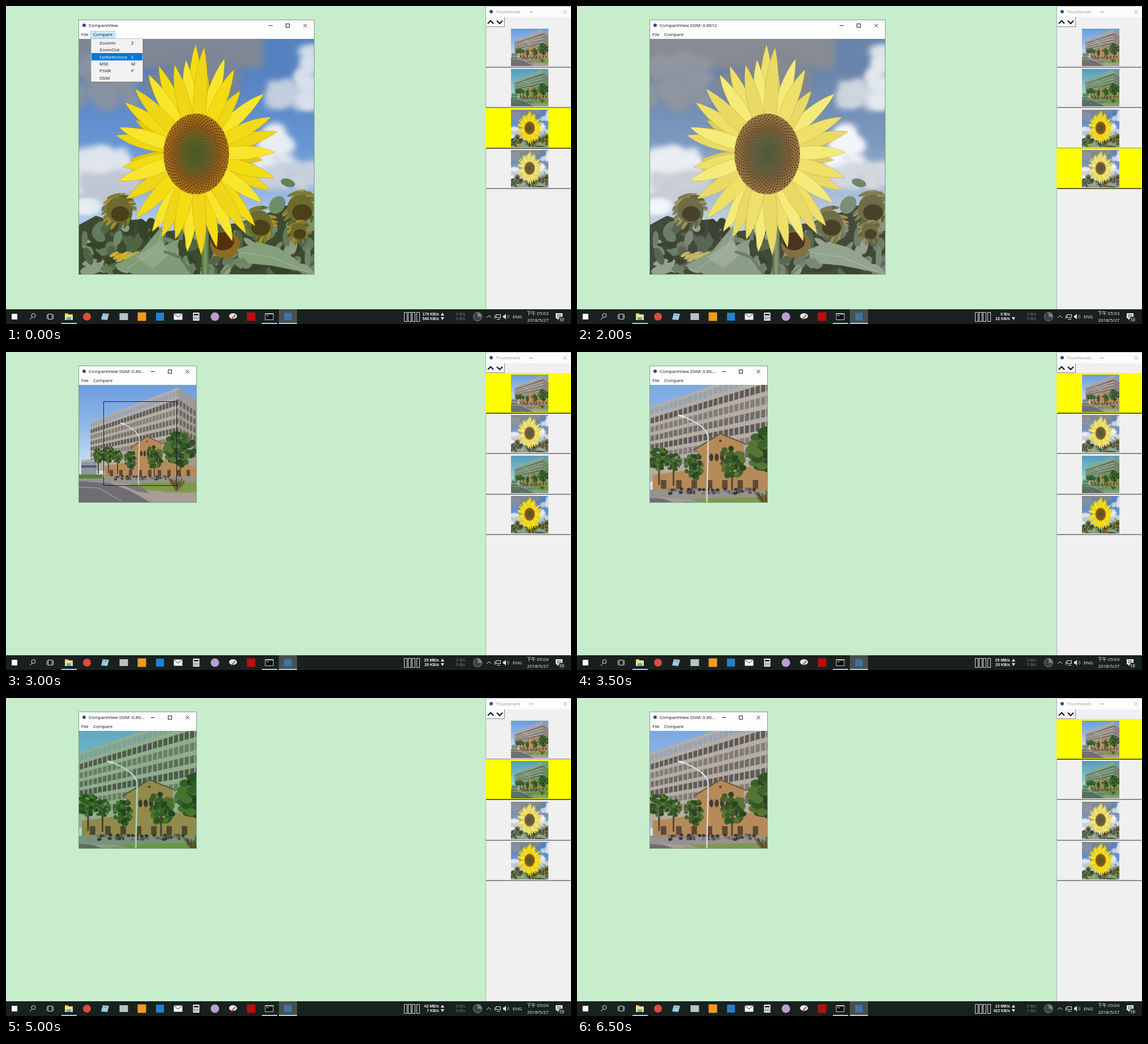
An HTML page with a canvas for the animation above (7 s loop, 998 by 561 pixels).

```html
<!DOCTYPE html>
<html lang="en">
<head>
<meta charset="utf-8">
<title>CompareView</title>
<style>
  html, body { margin: 0; width: 100%; height: 100%; overflow: hidden; background: #c7edcc; }
  canvas { display: block; }
</style>
</head>
<body>
<canvas id="stage" width="998" height="561"></canvas>
<script>
const stage = document.getElementById('stage').getContext('2d');
let c = stage; // current drawing context
const UI = '8px "Open Sans", "Noto Sans CJK TC", "Noto Sans CJK", sans-serif';
const METER = 'bold 7px "Liberation Sans", sans-serif';

// ---------- drawing helpers ----------
function seeded(seed) {
  return () => (seed = (seed * 16807) % 2147483647) / 2147483647;
}
function rect(x, y, w, h, fill) { c.fillStyle = fill; c.fillRect(x, y, w, h); }
function box(x, y, w, h, stroke) {
  c.strokeStyle = stroke; c.lineWidth = 1;
  c.strokeRect(x + .5, y + .5, w - 1, h - 1);
}
function ellipse(x, y, rx, ry, fill, turn = 0) {
  c.fillStyle = fill; c.beginPath(); c.ellipse(x, y, rx, ry, turn, 0, 7); c.fill();
}
function trace(points) {
  c.beginPath();
  for (let i = 0; i < points.length; i += 2) c.lineTo(points[i], points[i + 1]);
}
function poly(fill, ...points) { c.fillStyle = fill; trace(points); c.fill(); }
function line(stroke, width, ...points) {
  c.strokeStyle = stroke; c.lineWidth = width; trace(points); c.stroke();
}
function text(s, x, y, fill = '#111', font = UI, align = 'left') {
  c.font = font; c.textAlign = align; c.fillStyle = fill; c.fillText(s, x, y);
}
function blend(x0, y0, x1, y1, ...stops) {
  const g = c.createLinearGradient(x0, y0, x1, y1);
  stops.forEach((s, i) => g.addColorStop(i / (stops.length - 1), s));
  return g;
}

// ---------- pictures ----------
function picture(units, pixels, paint) {
  const canvas = document.createElement('canvas');
  canvas.width = canvas.height = pixels;
  c = canvas.getContext('2d');
  c.scale(pixels / units, pixels / units);
  paint();
  c = stage;
  return canvas;
}

function cloud(x, y, w, h, fill, rnd) {
  for (let i = 0; i < 30; i++) {
    const r = 6 + rnd() * Math.min(w, h) * .18;
    ellipse(x + rnd() * w, y + rnd() * h, r * 1.3, r, fill);
  }
}

function petal(x, y, width, fill) {
  const a = Math.atan2(y, x), length = Math.hypot(x, y);
  c.save();
  c.rotate(a);
  c.beginPath();
  c.moveTo(38, -width * .5);
  c.bezierCurveTo(length * .55, -width, length * .82, -width * .8, length, 0);
  c.bezierCurveTo(length * .82, width * .6, length * .55, width, 38, width * .5);
  c.fillStyle = fill; c.fill();
  c.strokeStyle = 'rgba(175,130,0,.4)'; c.lineWidth = .8; c.stroke();
  c.restore();
}

function droopingHead(x, y, r, rnd) {
  for (let i = 0; i < 26; i++) {
    const a = rnd() * 6.3;
    ellipse(x + Math.cos(a) * r * .8, y + Math.sin(a) * r, 3, r * .42,
            ['#a58d2a', '#7c7a35', '#58652a'][i % 3], a * .3);
  }
  ellipse(x, y, r * .8, r * .85, '#6c6b2e');
  ellipse(x + r * .1, y + r * .25, r * .6, r * .5, '#4b4019');
}

const petalTips = [
  335,68, 350,73, 386,93, 403,112, 414,150, 455,155, 468,196, 479,222, 475,258,
  474,303, 466,325, 452,347, 440,388, 424,402, 400,415, 372,426, 345,440, 320,434,
  299,412, 275,408, 258,398, 228,375, 212,340, 199,308, 206,284, 194,228, 200,214,
  210,170, 228,146, 252,121, 270,106, 298,104, 318,95];

function paintSunflower() {
  const rnd = seeded(77);
  rect(0, 0, 415, 415, blend(0, 60, 0, 320, '#5682c2', '#6897d4', '#aecaea'));
  c.filter = 'blur(6px)';
  rect(-10, -10, 335, 62, '#7e8894');
  cloud(0, 40, 95, 70, '#8792a2', rnd);
  cloud(130, 40, 170, 60, '#7b8593', rnd);
  cloud(340, 80, 60, 35, '#c3cfdf', rnd);
  cloud(390, 15, 25, 110, '#d9e1ec', rnd);
  cloud(0, 200, 85, 70, '#e0e5ed', rnd);
  cloud(10, 240, 90, 45, '#c0c8d4', rnd);
  cloud(320, 160, 50, 75, '#e9edf3', rnd);
  cloud(325, 225, 90, 32, '#c9d1dd', rnd);
  cloud(0, 292, 35, 8, '#e8edf4', rnd);
  c.filter = 'none';

  // field
  poly('#3d4a2f', 0,328, 30,312, 60,322, 110,318, 150,340, 280,325, 340,305, 360,295,
       400,290, 415,290, 415,415, 0,415);
  for (let i = 0; i < 150; i++) {
    const x = rnd() * 415, y = 328 + rnd() * 87;
    ellipse(x, y, 8 + rnd() * 13, 4 + rnd() * 7,
            ['#71866a', '#8c9d83', '#4f6644', '#35432a', '#647b5b'][i % 5], rnd() * 3);
  }
  ellipse(350, 293, 17, 13, '#6d8d69', -.9);
  ellipse(369, 254, 13, 7, '#62835a', .3);
  ellipse(410, 322, 9, 18, '#79946f');
  droopingHead(70, 302, 27, rnd);
  droopingHead(318, 326, 28, rnd);
  droopingHead(391, 299, 29, rnd);
  droopingHead(388, 340, 18, rnd);
  ellipse(258, 363, 26, 24, '#8d6a24');
  ellipse(254, 357, 20, 16, '#54310e');
  for (let i = 0; i < 8; i++) ellipse(62 + i * 6, 380 + i % 3 * 4, 9, 3, '#d0b02c', -.5);

  // stem and big leaves
  rect(216, 310, 13, 105, blend(216, 0, 229, 0, '#47673a', '#7f9c66', '#54733f'));
  poly('#7f9b77', 62,400, 110,374, 146,330, 150,365, 178,352, 168,382, 198,415, 95,415);
  poly('#91a887', 100,385, 146,355, 160,380, 130,405);
  poly('#86a07c', 278,372, 315,358, 352,368, 385,390, 410,414, 340,400, 300,396);
  line('#5f7d52', 5, 150,375, 178,385, 200,413);
  line('#6a875b', 4, 250,415, 270,397, 292,390);
  line('#a9bb9c', 1, 282,376, 340,385, 405,412);
  line('#a9bb9c', 1, 146,340, 136,372, 85,405);

  // blossom
  c.save();
  c.translate(207, 203);
  for (let i = 0; i < petalTips.length; i += 2) {
    const a = Math.atan2(petalTips[i + 1] - 261, petalTips[i] - 336) + .1;
    petal(Math.cos(a) * 118, Math.sin(a) * 142, 14, '#e6c80e');
  }
  for (let i = 0; i < petalTips.length; i += 2) {
    const n = (i * 5) % petalTips.length;
    petal(petalTips[n] - 336, petalTips[n + 1] - 261, 16,
          ['#f2dc14', '#f8e62c', '#efd616'][i / 2 % 3]);
  }
  c.scale(1, 1.23);
  const disc = c.createRadialGradient(0, 0, 4, 0, 0, 58);
  disc.addColorStop(0, '#4b5a26');
  disc.addColorStop(.45, '#6a5f24');
  disc.addColorStop(.65, '#8a5a1c');
  disc.addColorStop(1, '#b27a18');
  ellipse(0, 0, 58, 58, disc);
  for (let i = 1; i < 620; i++) {
    const r = 57 * Math.sqrt(i / 620), a = i * 2.39996;
    ellipse(Math.cos(a) * r, Math.sin(a) * r, .4 + r / 75, .4 + r / 75,
            r > 28 ? '#5c360f' : '#3d4418');
  }
  c.restore();
}

function tree(x, y, rx, ry, rnd) {
  line('#574735', 2, x, y, x, y + ry + 17);
  for (let i = 0; i < 60; i++) {
    const a = rnd() * 6.3, d = Math.sqrt(rnd()) * .85;
    ellipse(x + Math.cos(a) * rx * d, y + Math.sin(a) * ry * d, rx * .2, ry * .15,
            ['#2a4522', '#3d612c', '#335426', '#567433'][i % 4]);
  }
}

function paintBuilding() {
  const rnd = seeded(31);
  rect(0, 0, 207, 207, blend(0, 0, 0, 145, '#6c9ddd', '#90b9ea', '#cfe0f3'));

  // office block in perspective
  poly('#b5ada4', 20,66, 176,4, 176,162, 20,150);
  poly('#a1998f', 176,4, 207,27, 207,162, 176,162);
  const columns = 29, floors = 7;
  for (let i = 0; i < columns; i++) {
    const x = u => 20 + 156 * Math.pow(u, 1.12);
    const x0 = x((i + .2) / columns), x1 = x((i + .95) / columns);
    for (let j = 0; j < floors; j++) {
      const y = (px, v) => {
        const top = 66 - (px - 20) * .397;
        return top + (138 - (px - 20) * .12 - top) * v;
      };
      const v0 = (j + .28) / floors, v1 = (j + .9) / floors;
      const glass = j ? ['#706d6a', '#5e5a58', '#827d78'][(i * 3 + j) % 3] : '#93a4b8';
      poly(glass, x0, y(x0, v0), x1, y(x1, v0), x1, y(x1, v1), x0, y(x0, v1));
    }
  }
  for (let j = 0; j < floors; j++)
    for (let i = 0; i < 5; i++) {
      const x = 178 + i * 6, y = 11 + j * 16.5 + i * (4.4 - j * .45);
      poly(j ? '#6a6561' : '#8f9cac', x, y, x + 4, y + 2.5, x + 4, y + 12, x, y + 10);
    }

  // brick hall
  poly('#b58a58', 45,143, 94,136, 94,109, 120,91, 146,103, 147,132, 207,144, 207,164, 45,162);
  line('#6b5542', 1.5, 90,112, 120,91, 148,104);
  ellipse(120, 100, 1.5, 1.5, '#5e4330');
  for (let i = 0; i < 4; i++) ellipse(110 + i * 6, 121, 2.2, 5, '#463833');
  for (let i = 0; i < 9; i++) rect(54 + i * 17, 150, 6, 11, '#5d4936');

  // left pavilion
  rect(4, 136, 27, 26, '#8d969e');
  ellipse(17, 134, 13, 2.5, '#a4adb4');
  rect(4, 142, 27, 4, '#535e68');

  // ground
  rect(0, 162, 207, 45, '#96928e');
  poly('#6d6d72', 0,170, 60,174, 85,184, 125,207, 0,207);
  poly('#a89c96', 52,172, 120,176, 150,190, 207,188, 207,207, 128,207, 88,186);
  poly('#7d9a4a', 85,174, 207,170, 207,190, 160,189, 112,184);
  poly('#7a7775', 78,177, 110,179, 125,191, 102,188);
  line('#b5b3b2', 1, 0,180, 35,182, 75,205);
  rect(0, 158, 42, 7, '#5b8039');

  tree(34, 125, 10, 15, rnd);
  tree(52, 123, 13, 16, rnd);
  tree(68, 127, 9, 13, rnd);
  tree(91, 132, 11, 19, rnd);
  tree(133, 127, 16, 23, rnd);
  tree(179, 113, 30, 33, rnd);
  for (let i = 0; i < 60; i++)
    ellipse(62 + rnd() * 100, 161 + rnd() * 6, 2, 1.8, ['#37353a', '#5a5457', '#81797a'][i % 3]);
  for (let i = 0; i < 26; i++)
    line(i % 2 ? '#5f4634' : '#6e6d35', 1.6, 172, 187, 157 + rnd() * 30, 163 + rnd() * 13);

  // street lamp
  c.strokeStyle = '#d9dcdf'; c.lineWidth = 1.5;
  c.beginPath(); c.moveTo(105, 178); c.lineTo(106.5, 95);
  c.quadraticCurveTo(104, 80, 78, 69); c.stroke();
  ellipse(77, 68.5, 4, 1.3, '#e3e7ec', .3);
}

const sunflower = picture(415, 415, paintSunflower);
const building = picture(207, 414, paintBuilding);
const photos = {
  sunflower: { image: sunflower, size: 415 },
  faded: { size: 415, image: picture(415, 415, () => {
    c.filter = 'saturate(.58) brightness(1.04)';
    c.drawImage(sunflower, 0, 0);
  }) },
  building: { image: building, size: 207 },
  green: { size: 207, image: picture(207, 414, () => {
    c.drawImage(building, 0, 0, 207, 207);
    c.globalCompositeOperation = 'multiply';
    rect(0, 0, 207, 207, '#cdffd9');
  }) },
};
for (const p of Object.values(photos))
  p.thumb = picture(66, 66, () => {
    c.imageSmoothingQuality = 'high';
    c.drawImage(p.image, 0, 0, 66, 66);
  });

// ---------- windows ----------
function minimize(x, y, ink) { rect(x - 3, y, 7, 1, ink); }
function closeMark(x, y, ink) {
  line(ink, 1, x - 3, y - 3, x + 3, y + 3);
  line(ink, 1, x - 3, y + 3, x + 3, y - 3);
}
function appIcon(x, y) { ellipse(x, y, 3, 3, '#2d4f82'); }

const menuItems = [['ZoomIn', 'Z'], ['ZoomOut', ''], ['SetReference', 'S'],
                   ['MSE', 'M'], ['PSNR', 'P'], ['SSIM', '']];

function drawMenu(chosen) {
  rect(151, 58, 92, 77, 'rgba(0,0,0,.2)');
  rect(150, 57, 92, 77, '#f2f2f2');
  box(150, 57, 92, 77, '#c4c4c4');
  menuItems.forEach(([name, key], i) => {
    const y = 59 + i * 12.3, on = name === chosen;
    if (on) rect(151, Math.floor(y), 90, 13, '#0078d7');
    text(name, 165, y + 9, on ? '#fff' : '#111');
    text(key, 221, y + 9, on ? '#fff' : '#111');
  });
}

// the marked part of the picture, which zooming stretches to the whole view
const mark = { x: 42, y: 29, w: 130, h: 149 };

function drawViewer({ photo, title, menu, zoom, marquee }) {
  const { image, size } = photos[photo], right = 129 + size;
  rect(128, 24, size + 2, size + 35, '#87998c');
  rect(129, 25, size, 33, '#fcfdfc');
  appIcon(138, 34);
  text(title, 146, 37);
  minimize(right - 77, 34, '#222');
  box(right - 50, 31, 7, 7, '#222');
  closeMark(right - 15.5, 34.5, '#222');
  if (menu) { rect(149, 44, 44, 13, '#cce8ff'); box(149, 44, 44, 13, '#99d1ff'); }
  text('File', 133, 53);
  text('Compare', 154, 53);
  if (zoom) {
    const k = image.width / size;
    c.drawImage(image, mark.x * k, mark.y * k, mark.w * k, mark.h * k, 129, 58, size, size);
  } else c.drawImage(image, 129, 58, size, size);
  if (marquee) box(129 + mark.x + 1, 58 + mark.y, mark.w, mark.h, '#16202a');
  if (menu) drawMenu(menu);
}

function drawThumbnails(order, selected) {
  rect(847, 0, 151, 535, '#f0f0f0');
  rect(847, 0, 1, 535, '#a3b5a7');
  rect(848, 0, 150, 20, '#fcfcfc');
  rect(847, 0, 151, 1, '#b9c4bb');
  appIcon(857, 10);
  text('Thumbnails', 865, 13, '#999');
  minimize(927, 10, '#999');
  closeMark(987.5, 10.5, '#999');
  for (const [x, dir] of [[848, 1], [864, -1]]) {
    rect(x, 20, 17, 17, '#8a8a8a');
    rect(x, 20, 16, 16, '#f6f6f6');
    line('#111', 2, x + 3, 28.5 + 2.5 * dir, x + 8, 28.5 - 2.5 * dir, x + 13, 28.5 + 2.5 * dir);
  }
  order.forEach((name, i) => {
    const y = 37 + Math.round(i * 71.4);
    if (name === selected) rect(847, y, 151, 71, '#ffff00');
    c.drawImage(photos[name].thumb, 892, y + 3);
    rect(848, y + 70, 150, 2, name === selected ? '#5e5e3a' : '#8c8c8c');
  });
}

// ---------- taskbar ----------
function block(x, fill, w = 14, h = 14) { rect(x - w / 2, 548 - h / 2, w, h, fill); }

function drawApps() {
  block(15, '#fff', 10, 10);
  c.strokeStyle = '#e6e8e7'; c.lineWidth = 1;
  c.beginPath(); c.arc(48.5, 546, 3.5, 0, 7); c.stroke();
  line('#e6e8e7', 1, 46, 549, 42, 553);
  box(74, 543, 8, 10, '#d8dbda');
  line('#d8dbda', 1, 72.5, 544, 72.5, 552);
  line('#d8dbda', 1, 83.5, 544, 83.5, 552);

  rect(104, 542, 6, 3, '#e8b64a');
  rect(104, 544, 14, 10, '#fbdc83');
  rect(107, 549, 8, 5, '#5aa9dc');
  ellipse(143, 548, 7, 7, '#dd4b3e');
  poly('#9fcbdc', 171,542, 182,543, 179,554, 168,553);
  line('#5d8ba3', 1, 172,545, 179,546);
  block(208, '#b9c2c6', 15, 12);
  block(240, '#f39a1f', 15, 15);
  block(272, '#2082cf');
  block(304, '#fff', 15, 11);
  line('#222', 1, 297, 543, 304, 549, 311, 543);
  block(336, '#fff', 11, 14);
  rect(332, 543, 8, 3, '#222');
  for (let i = 0; i < 9; i++) rect(332 + i % 3 * 3, 548 + (i / 3 | 0) * 2, 2, 1, '#222');
  ellipse(369, 548, 7.5, 7.5, '#b9a0d3');
  ellipse(401, 547, 7, 5, '#dfe8ef');
  line('#cc4a3c', 2, 398, 553, 405, 545);
  block(433, '#b90f0b', 15, 15);
  block(465, '#c7cccb', 15, 12);
  rect(458.5, 544, 13, 9, '#0a0a0a');
  rect(460, 546, 4, 1, '#ddd');
  rect(482, 535, 32, 26, '#49514f');
  block(498, '#3f73a8', 13, 13);
  for (const [x, w] of [[98, 27], [452, 27], [482, 32]]) rect(x, 559, w, 2, '#a9c9dc');
}

function drawRate(rate, y, up) {
  text(rate, 765, y, '#f2f2f2', METER, 'right');
  if (rate === '0 B/s') return;
  const base = up ? y : y - 5, tip = up ? y - 5 : y;
  poly('#f2f2f2', 768, base, 774, base, 771, tip);
}

function drawTaskbar({ up, down, clock }) {
  rect(0, 535, 998, 26, '#19211f');
  drawApps();
  for (let i = 0; i < 4; i++) box(703 + Math.round(i * 7.2), 540, 6, 17, '#d5d8d7');
  drawRate(up, 546, true);
  drawRate(down, 554, false);
  for (const y of [546, 554]) text('0 B/s', 811, y, '#7c8381', METER.replace('bold ', ''), 'right');
  ellipse(833, 548, 8, 8, '#3b4341');
  c.strokeStyle = '#78807e'; c.lineWidth = 1;
  c.beginPath(); c.arc(833, 548, 7.5, 0, 7); c.stroke();
  c.fillStyle = '#7b8381';
  c.beginPath(); c.moveTo(833, 548); c.arc(833, 548, 7, -1.57, .1); c.fill();
  line('#e4e6e5', 1, 849, 550, 853, 546, 857, 550);
  box(865, 544, 9, 6, '#e4e6e5');
  rect(863, 546, 1, 6, '#e4e6e5');
  rect(867, 552, 6, 1, '#e4e6e5');
  poly('#e4e6e5', 878,546, 880,546, 883,543, 883,553, 880,550, 878,550);
  c.strokeStyle = '#9aa09e';
  for (const r of [3, 5.5]) { c.beginPath(); c.arc(883, 548, r, -.8, .8); c.stroke(); }
  text('ENG', 895, 551, '#f2f2f2');
  text('下午 ' + clock, 939, 545, '#f2f2f2', UI, 'center');
  text('2018/5/27', 939.5, 557, '#f2f2f2', UI, 'center');
  poly('#f2f2f2', 971,542, 983,542, 983,551, 977,551, 974,554, 974,551, 971,551);
  for (const y of [544, 546, 548]) rect(973, y, 8, 1, '#59605e');
  ellipse(981.5, 553, 5.5, 5, '#303836');
  text('10', 981.5, 555.5, '#fff', '7px "Open Sans", sans-serif', 'center');
}

// ---------- timeline: one step per half second ----------
const byName = ['building', 'green', 'sunflower', 'faded'];
const shuffled = ['building', 'faded', 'green', 'sunflower'];
const ranked = ['building', 'green', 'faded', 'sunflower'];
const ssim = 'CompareView SSIM: 0.8612';
const cut = 'CompareView SSIM: 0.86...';
const flower = (photo, title, menu, up, down, order = byName) =>
  ({ photo, title, menu, up, down, order, clock: '05:03' });
const house = (photo, order, up, down, extra) =>
  ({ photo, order, up, down, title: cut, clock: '05:04', ...extra });
const zoom = { zoom: true };

const steps = [
  flower('sunflower', 'CompareView', 'SetReference', '179 KB/s', '546 KB/s'),
  flower('faded', 'CompareView', 'MSE', '179 KB/s', '546 KB/s'),
  flower('faded', 'CompareView MSE: 1339.3424', 'SSIM', '10 KB/s', '67 KB/s'),
  flower('faded', ssim, '', '10 KB/s', '67 KB/s'),
  flower('faded', ssim, '', '0 B/s', '22 KB/s'),
  flower('faded', ssim, '', '0 B/s', '22 KB/s', shuffled),
  house('building', shuffled, '25 MB/s', '20 KB/s', { marquee: true }),
  house('building', shuffled, '25 MB/s', '20 KB/s', zoom),
  house('building', shuffled, '14 MB/s', '341 KB/s', zoom),
  house('green', shuffled, '14 MB/s', '341 KB/s'),
  house('green', ranked, '42 MB/s', '7 KB/s', zoom),
  house('building', ranked, '42 MB/s', '7 KB/s', zoom),
  house('green', ranked, '13 MB/s', '422 KB/s', zoom),
  house('building', ranked, '13 MB/s', '422 KB/s', zoom),
];

function render() {
  const step = steps[Math.floor(performance.now() % 7000 / 500)];
  rect(0, 0, 998, 561, '#c7edcc');
  drawViewer(step);
  drawThumbnails(step.order, step.photo);
  drawTaskbar(step);
  requestAnimationFrame(render);
}
render();
</script>
</body>
</html>
```
